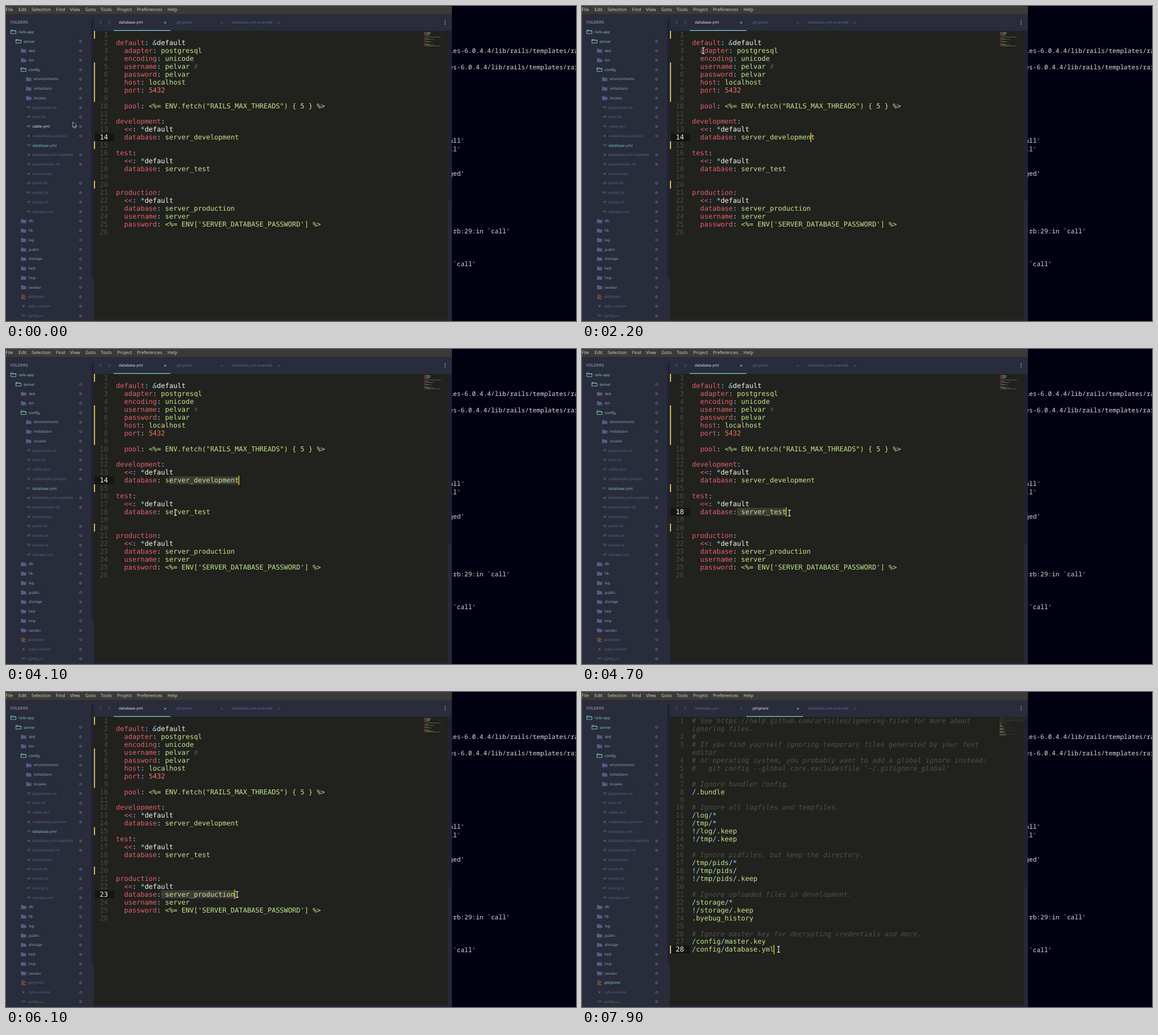
An HTML page for the animation above (8000 ms loop, 1006 by 557 pixels).

```html
<!DOCTYPE html>
<html lang="en">
<head>
<meta charset="utf-8">
<title>Editor session</title>
<style>
html, body { margin: 0; width: 100%; height: 100%; overflow: hidden; background: #010010; }
svg { display: block; }
text { white-space: pre; text-rendering: geometricPrecision; }
.code { font: 12.02px "DejaVu Sans Mono", monospace; }
.ui { font: 6.29px "DejaVu Sans", sans-serif; }
.menu { font: 8.06px "Noto Sans", sans-serif; fill: #cbc9c2; }
.term { font: 11.17px "Noto Sans Mono", monospace; fill: #dededf; }
.num { fill: #4b4b46; text-anchor: end; }
.num.on { fill: #f4f4f0; }
.item { fill: #5c6489; }
.item.dir { fill: #979fbe; }
.item.open { fill: #80cbc4; }
.item .icon { color: #626a90; }
.item.dir .icon { color: #565d85; }
.item.open .icon { color: #80cbc4; }
.item.git .icon { color: #b5713f; }
.item.hover { fill: #f2f3f7; }
.item.hover .icon { color: #8890b4; }
.item.active { fill: #80cbc4; }
.tab { fill: #626a8e; }
.tab.on { fill: #eef0f6; }
</style>
</head>
<body>
<svg id="stage" width="1006" height="557" viewBox="0 0 1006 557"></svg>
<script>
const NS = 'http://www.w3.org/2000/svg';
const stage = document.getElementById('stage');
const LEFT = 194, TOP = 44, CW = 7.235, LH = 13.94;
const RED = '#e0606e', CYAN = '#89ddff', GREEN = '#c0e68b', WHITE = '#f4f4f0', GREY = '#50504b', ORANGE = '#f0765f';

function el(tag, attrs, parent = stage, text) {
  const e = document.createElementNS(NS, tag);
  for (const k in attrs) e.setAttribute(k, attrs[k]);
  if (text !== undefined) e.textContent = text;
  parent.appendChild(e);
  return e;
}
const rect = (x, y, width, height, fill, parent) => el('rect', { x, y, width, height, fill }, parent);
const label = (cls, x, y, text, parent) => el('text', { class: cls, x, y }, parent, text);
const group = cls => el('g', { class: cls || '' });

// terminal, partly covered by the editor
rect(0, 0, 1006, 557, '#010010');
[
  [79.5, 'ies-6.0.4.4/lib/rails/templates/ra'],
  [108.5, 'es-6.0.4.4/lib/rails/templates/rai'],
  [238.5, "all'"], [253, "ll'"], [296.5, "ged'"],
  [398, ".rb:29:in `call'"], [456, " `call'"]
].forEach(([y, s]) => label('term', 782.3, y + 3.8, s));

// window
rect(0, 0, 787, 557, '#292c3b');
rect(0, 0, 787, 14, '#3b3a36');
rect(155, TOP, 626, 510, '#21211d');
rect(780, TOP, 7, 513, '#262938');
rect(780.5, TOP, 6, 301, '#1f2231');
rect(155, 553.5, 625, 3.5, '#222534');
rect(150.5, 22, 4, 458, '#1f2231');
[['File', -.5], ['Edit', 22], ['Selection', 45], ['Find', 88], ['View', 113], ['Goto', 140],
 ['Tools', 167], ['Project', 196], ['Preferences', 231], ['Help', 285]]
  .forEach(([s, x]) => label('menu', x, 9.4, s));

// sidebar
el('text', { class: 'ui', x: 8, y: 31.2, fill: '#a3aac8', style: 'font-size:6.6px' }, stage, 'FOLDERS');
const tree = `o0 rails-app|o1 server|d2 app|d2 bin|o2 config|d3 environments|d3 initializers|d3 locales
c3 application.rb|c3 boot.rb|c3 cable.yml|s3 credentials.yml.enc|c3 database.yml|s3 database.yml.example
c3 environment.rb|s3 master.key|c3 puma.rb|c3 routes.rb|c3 spring.rb|c3 storage.yml
d2 db|d2 lib|d2 log|d2 public|d2 storage|d2 test|d2 tmp|d2 vendor|g2 .gitignore|s2 .ruby-version|c2 config.ru`
  .split(/[|\n]/);
const ROW = 16.73;
const icons = {
  o: 'M-4.5 3.2V-3.2H-1L0 -2H4.5V3.2ZM-4.5 -1.6H4.5',
  d: 'M-4.5 3.5V-3.2H-1L0 -2H4.5V3.5Z',
  c: 'M-1.6 -2L-3.1 -.4L-1.6 1.2M1.6 -2L3.1 -.4L1.6 1.2M.6 -2.6L-.6 1.8',
  s: 'M0 -2V2M-1.8 -1L1.8 1M-1.8 1L1.8 -1',
  g: 'M-4 -3H1.5M-4 -.8H4M-4 1.4H1.5M-4 3.5H4'
};
const classes = { o: 'open', d: 'dir', c: '', s: '', g: 'git' };
const noDot = ['rails-app', 'database.yml', 'master.key'];
const items = tree.map((entry, i) => {
  const kind = entry[0], depth = +entry[1], name = entry.slice(3);
  const y = 45.6 + i * ROW, isDir = 'od'.includes(kind);
  const g = group('item ' + classes[kind]);
  el('path', {
    class: 'icon', d: icons[kind], transform: `translate(${13 + 9 * depth} ${y})`,
    fill: kind === 'd' ? 'currentColor' : 'none', stroke: 'currentColor', 'stroke-width': kind === 'd' ? .2 : .9
  }, g);
  label('ui', (isDir ? 22 : 19.5) + 9 * depth, y + 2.2, name, g);
  if (!noDot.includes(name))
    el('circle', { cx: 131.7, cy: y + .2, r: 1.8, fill: 'none', stroke: '#8087a6', 'stroke-width': .8 }, g);
  return { g, name };
});

// tab bar
const line = (d, stroke, width = 1, parent) => el('path', { d, stroke, 'stroke-width': width, fill: 'none' }, parent);
line('M168.5 26L165.5 29L168.5 32M180.5 26L183.5 29L180.5 32', '#646b8d');
[26, 29, 32].forEach(cy => el('circle', { cx: 775, cy, r: .9, fill: '#8f97b6' }));
const tabs = ['database.yml', '.gitignore', 'database.yml.example'].map((name, i) => {
  const x = 190 + i * 100, g = group('tab');
  label('ui', x + 9, 31.2, name, g);
  const cross = line(`M${x + 89.3} 27.8l3.4 3.4m0 -3.4l-3.4 3.4`, '#5a6183', .9, g);
  const bar = rect(x, 42.7, 100, 1.3, '#80cbc4', g);
  return { g, cross, bar };
});

// documents: tokens are [text, colour, italic]
function ymlTokens(s) {
  const m = s.match(/^( *)([\w<]+)(:)( *)(.*)$/);
  if (!m) return [[s, WHITE]];
  const out = [[m[1], WHITE], [m[2], RED], [m[3], CYAN], [m[4], WHITE]], v = m[5];
  if (/^[&*]/.test(v)) out.push([v[0], CYAN, true], [v.slice(1), WHITE]);
  else if (/^\d/.test(v)) out.push([v, ORANGE]);
  else {
    const cut = v.indexOf('#');
    out.push([cut < 0 ? v : v.slice(0, cut), GREEN]);
    if (cut >= 0) out.push([v.slice(cut), GREY, true]);
  }
  return out;
}
function gitTokens(s, comment) {
  if (comment) return [[s, GREY, true]];
  return s.split(/([\/!*])/).map(p => [p, /^[\/!*]$/.test(p) ? CYAN : GREEN]);
}

const yml = `
default: &default
  adapter: postgresql 
  encoding: unicode
  username: pelvar # 
  password: pelvar
  host: localhost
  port: 5432

  pool: <%= ENV.fetch("RAILS_MAX_THREADS") { 5 } %>

development:
  <<: *default
  database: server_development

test:
  <<: *default
  database: server_test


production:
  <<: *default
  database: server_production
  username: server
  password: <%= ENV['SERVER_DATABASE_PASSWORD'] %>
`.split('\n');

// "~>" starts the wrapped rest of the line above
const git = `# See https://help.github.com/articles/ignoring-files for more about
~>ignoring files.
#
# If you find yourself ignoring temporary files generated by your text
~>editor
# or operating system, you probably want to add a global ignore instead:
#   git config --global core.excludesfile '~/.gitignore_global'

# Ignore bundler config.
/.bundle

# Ignore all logfiles and tempfiles.
/log/*
/tmp/*
!/log/.keep
!/tmp/.keep

# Ignore pidfiles, but keep the directory.
/tmp/pids/*
!/tmp/pids/
!/tmp/pids/.keep

# Ignore uploaded files in development.
/storage/*
!/storage/.keep
.byebug_history

# Ignore master key for decrypting credentials and more.
/config/master.key
/config/database.yml`.split('\n');

const rowTop = r => TOP + r * LH;
const gutterBar = rect(157, 0, 34, LH, '#151512');
const selection = group();

function buildDoc(rows, tokens, changed) {
  const g = group();
  let n = 0;
  const nums = [];
  rows.forEach((raw, r) => {
    const wrapped = raw.startsWith('~>'), s = wrapped ? raw.slice(2) : raw;
    const base = rowTop(r) + 11.15;
    if (!wrapped) n++;
    nums.push(label('code num', 180, base, wrapped ? '' : n, g));
    if (changed.includes(n)) rect(155.3, rowTop(r), 1.8, LH, '#e8cf6a', g);
    const t = label('code', LEFT, base, '', g);
    let col = 0;
    for (const [part, fill, italic] of tokens(s, wrapped || s[0] === '#')) {
      if (!part) continue;
      const span = el('tspan', { fill }, t, part);
      if (italic) span.setAttribute('font-style', 'italic');
      if (part.trim()) {
        const mark = rect(737 + col * .6, 45 + r * 1.06, part.length * .6, .7, fill, g);
        mark.setAttribute('opacity', .5);
      }
      col += part.length;
    }
  });
  return { g, nums, rows };
}
const docs = [
  buildDoc(yml, ymlTokens, [1, 5, 6, 7, 8, 9, 15, 20]),
  buildDoc(git, gitTokens, [28])
];
const caret = rect(0, 0, 1.4, 16.5, '#f8c81c');

// pointers
const arrow = el('path', {
  d: 'M0 0V9.6L2.2 7.6L3.8 11L5.4 10.3L3.9 7H6.9Z', fill: '#08080a', stroke: '#f2f2f2', 'stroke-width': .8
});
const beam = group();
const beamShape = 'M-2.4 -5.4Q0 -5.4 0 -4V4Q0 5.4 -2.4 5.4M2.4 -5.4Q0 -5.4 0 -4V4Q0 5.4 2.4 5.4';
line(beamShape, '#0a0a0a', 2.4, beam);
line(beamShape, '#f0f0f0', 1.2, beam);

// each move: from, until, x, y
const moves = [
  [0, 600, 98, 230], [700, 1100, 48, 244], [1200, 1300, 190, 195], [1300, 1500, 311, 95],
  [1500, 1600, 272, 80], [1700, 2000, 218, 79], [2100, 2200, 214, 79], [2200, 2500, 310, 137],
  [2600, 2700, 310, 138], [2900, 3100, 335, 175], [3100, 3300, 287, 238], [3400, 3500, 287, 236],
  [3500, 3800, 416, 236], [3800, 3900, 408, 236], [4000, 4100, 299, 289], [4100, 4300, 275, 290],
  [4300, 4700, 366, 290], [4700, 4900, 311, 367], [5000, 5200, 285, 380], [5200, 5400, 270, 369],
  [5500, 5700, 275, 360], [5700, 5800, 275, 359], [5800, 6100, 408, 358], [6200, 6300, 404, 335],
  [6300, 6500, 380, 170], [6500, 6700, 330, 55], [6700, 6900, 309, 26], [7200, 7300, 310, 60],
  [7300, 7600, 332, 410], [7700, 7900, 347, 455]
];
function mouseAt(t) {
  let x = 118, y = 205;
  for (const [a, b, mx, my] of moves) {
    const k = Math.min(1, Math.max(0, (t - a) / (b - a)));
    x += (mx - x) * k;
    y += (my - y) * k;
  }
  return { x, y };
}

// each drag: from, until, anchor row, anchor column
const drags = [[2300, 2500, 2, 3], [3500, 3800, 13, 13], [4300, 4700, 17, 11], [5800, 6100, 22, 11]];
function editState(t) {
  if (t >= 7000) return { row: 29, col: 20 };
  const drag = drags.filter(d => t >= d[0]).pop();
  if (!drag) return { row: 13, col: 29, hidden: t < 2200 };
  const m = mouseAt(Math.min(t, drag[1]));
  const row = Math.floor((m.y - TOP) / LH);
  const col = Math.max(0, Math.min(yml[row].length, Math.round((m.x - LEFT) / CW)));
  return { row, col, from: drag.slice(2) };
}

function drawSelection({ row, col, from }) {
  selection.textContent = '';
  if (!from) return;
  const [r0, c0] = from;
  for (let r = r0; r <= row; r++) {
    const a = r === r0 ? c0 : 0, b = r === row ? col : yml[r].length;
    if (b <= a) continue;
    rect(LEFT + a * CW, rowTop(r), (b - a) * CW, LH + .1, '#3c3c38', selection);
    for (let c = a; c < b; c++)
      if (yml[r][c] === ' ')
        el('circle', { cx: LEFT + (c + .5) * CW, cy: rowTop(r) + 7.2, r: .75, fill: '#6a6a64' }, selection);
  }
}

const show = (e, on) => e.setAttribute('visibility', on ? 'visible' : 'hidden');

function render(t) {
  const m = mouseAt(t), s = editState(t), view = t >= 7000 ? 1 : 0;
  docs.forEach((d, i) => {
    d.g.style.display = i === view ? '' : 'none';
    d.nums.forEach((n, r) => n.classList.toggle('on', r === s.row));
  });
  gutterBar.setAttribute('y', rowTop(s.row));
  caret.setAttribute('x', LEFT + s.col * CW - .7);
  caret.setAttribute('y', rowTop(s.row) - 1.2);
  show(caret, !s.hidden);
  drawSelection(s);

  const hoverRow = m.x < 150 && m.y > 37 ? Math.round((m.y - 45.6) / ROW) : -1;
  const current = ['database.yml', '.gitignore'][view];
  items.forEach(({ g, name }, i) => {
    g.classList.toggle('active', name === current);
    g.classList.toggle('hover', i === hoverRow && name !== current);
  });
  const inTabs = m.y > 14 && m.y < TOP;
  tabs.forEach(({ g, cross, bar }, i) => {
    const x = 190 + i * 100, on = i === view;
    g.classList.toggle('on', on);
    cross.setAttribute('stroke', on ? '#a9dcd7' : '#5a6183');
    show(bar, on || (inTabs && m.x >= x && m.x < x + 100));
  });

  const isArrow = m.x < 155 || m.y < TOP;
  show(arrow, isArrow);
  show(beam, !isArrow);
  (isArrow ? arrow : beam).setAttribute('transform', `translate(${m.x} ${m.y})`);
}

let last = -1;
const start = performance.now();
function tick(now) {
  const t = Math.floor(Math.max(0, now - start) % 8000 / 100) * 100;
  if (t !== last) render(last = t);
  requestAnimationFrame(tick);
}
render(0);
requestAnimationFrame(tick);
</script>
</body>
</html>
```
